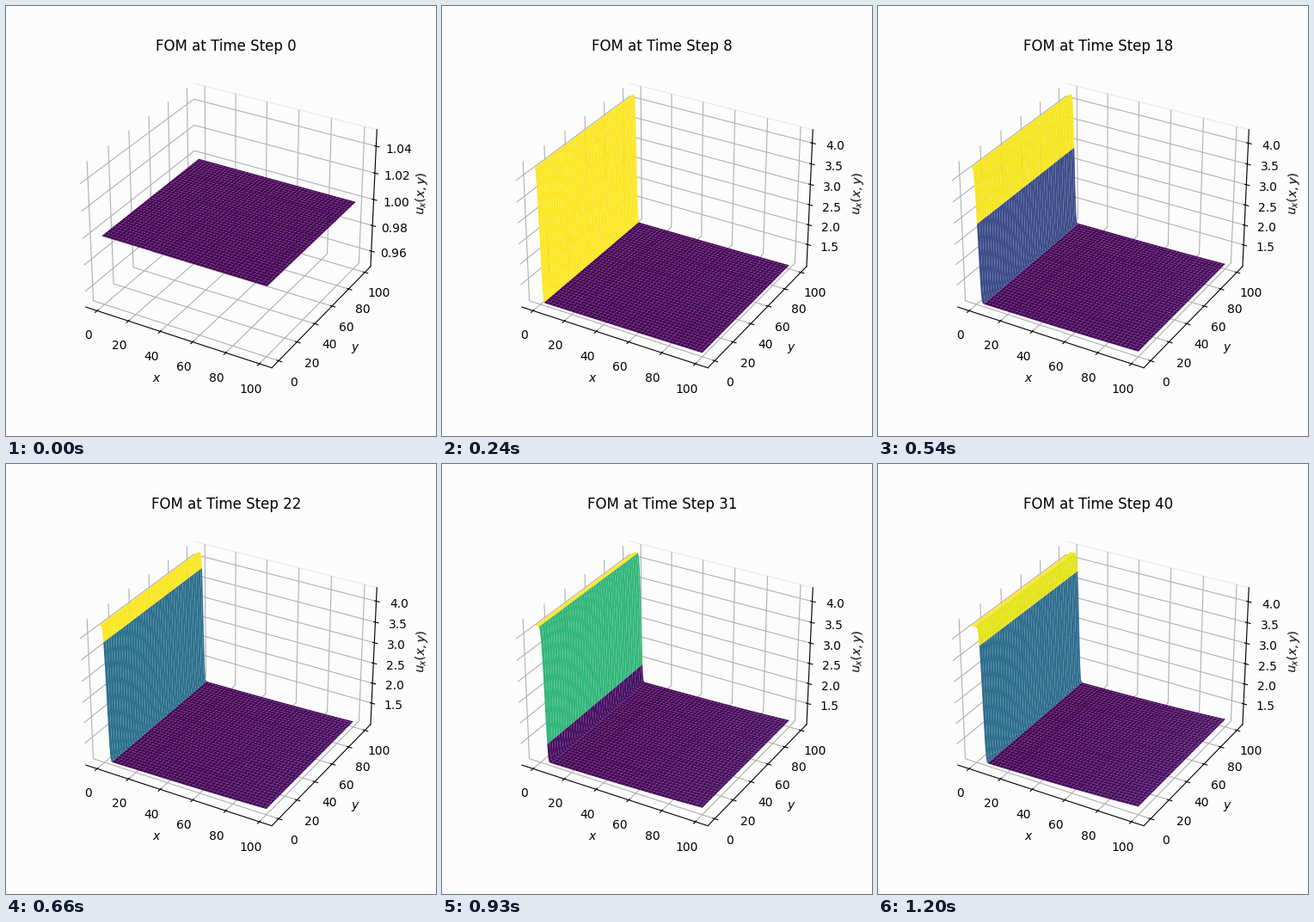
These frames come from a looping animation (500 px wide and 500 px high, 1.23 s). A matplotlib script:

```python
import numpy as np
import matplotlib.pyplot as plt
from matplotlib.animation import FuncAnimation

STEPS = 41
N = 251
DT = 0.05
INFLOW, GROWTH = 4.25, 0.015
PAPER = "#fcfcfc"
PANE_EDGE = "#ececec"

x = np.linspace(0, 100, N)
X, Y = np.meshgrid(x, x)
source = 0.02 * np.exp(GROWTH * x)
g = DT / (4 * (x[1] - x[0]))


def advance(u):
    """One trapezoidal step of u_t + (u^2 / 2)_x = source, upwind in x."""
    rhs = u + DT * source
    rhs[1:] -= g * np.diff(u**2)
    new = np.empty_like(u)
    new[0] = INFLOW
    for i in range(1, N):
        c = rhs[i] + g * new[i - 1] ** 2
        new[i] = (np.sqrt(1 + 4 * g * c) - 1) / (2 * g)
    return new


history = [np.ones(N)]
for _ in range(STEPS - 1):
    history.append(advance(history[-1]))

fig = plt.figure(figsize=(5, 5), dpi=100, facecolor=PAPER)
ax = fig.add_subplot(projection="3d")


def trim_zticks():
    """Drop ticks that fall in the margin around the data range."""
    lo, hi = ax.get_zlim()
    pad = (hi - lo) / 50
    ax.set_zticks([t for t in ax.get_zticks() if lo + pad <= t <= hi - pad])


def draw(step):
    ax.clear()
    ax.set_facecolor(PAPER)
    for axis in (ax.xaxis, ax.yaxis, ax.zaxis):
        axis.set_pane_color(PAPER)
    ax.yaxis.pane.set_edgecolor(PANE_EDGE)
    ax.plot_surface(X, Y, np.tile(history[step], (N, 1)), cmap="viridis")
    trim_zticks()
    ax.set_xlabel("$x$")
    ax.set_ylabel("$y$")
    ax.set_zlabel("$u_x(x,y)$")
    ax.set_title(f"FOM at Time Step {step}")
    return []


anim = FuncAnimation(fig, draw, frames=STEPS, interval=30,
                     init_func=lambda: [], repeat=True, repeat_delay=0)
plt.show()
```
